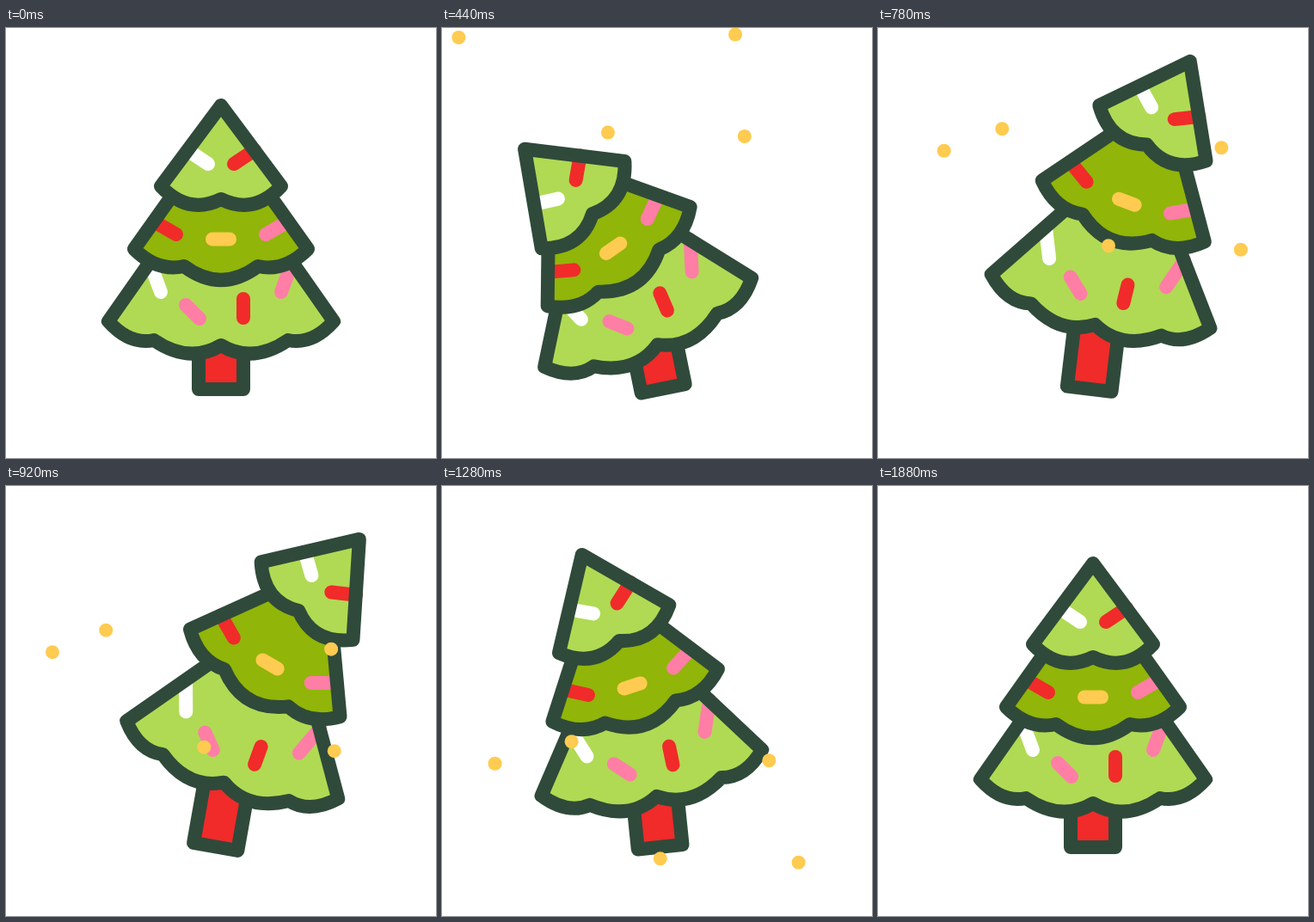
Write an HTML page that moves like this. It is 500 by 500 pixels and loops after 2.4 s.

```html
<!DOCTYPE html>
<html lang="en">
<head>
<meta charset="utf-8">
<title>Swaying tree</title>
<style>
  html, body { margin: 0; width: 100%; height: 100%; overflow: hidden; background: #fff; }
  svg { display: block; width: 100vw; height: 100vh; }
  path { stroke-width: 16; stroke-linecap: round; stroke-linejoin: round; fill: none; }
  .edge { stroke: #2f4a3a; }
  .light { fill: #b0da53; }
  .deep { fill: #91b508; }
  .red { stroke: #f02b2a; }
  .pink { stroke: #ff7ea5; }
  .white { stroke: #fff; }
  .gold { stroke: #ffcb50; }
  circle { fill: #ffcb50; }
</style>
</head>
<body>
<svg viewBox="0 0 500 500">
  <g class="part">
    <path class="edge" style="fill:#f02b2a" d="M224 325H276V420H224Z"/>
    <g class="part">
      <path class="light" d="M250 154L119 341Q144 369 172 363Q213 391 250 369Q287 391 328 363Q356 369 381 341Z"/>
      <path class="white" d="M167 272L180 307"/>
      <path class="pink" d="M333 272L320 307M209 322L225 338"/>
      <path class="red" d="M276 315V337"/>
      <path class="edge" d="M250 154L119 341Q144 369 172 363Q213 391 250 369Q287 391 328 363Q356 369 381 341Z"/>
      <g class="part">
        <path class="deep" d="M250 115L149 257Q176 284 207 277Q250 309 293 277Q324 284 351 257Z"/>
        <path class="red" d="M172 225L198 240"/>
        <path class="pink" d="M328 225L302 240"/>
        <path class="gold" d="M240 245.500H260"/>
        <path class="edge" d="M250 115L149 257Q176 284 207 277Q250 309 293 277Q324 284 351 257Z"/>
        <g class="part">
          <path class="light" d="M250 90L180 184Q212 218 250 199Q288 218 320 184Z"/>
          <path class="white" d="M211 142L235 158"/>
          <path class="red" d="M289 142L265 158"/>
          <path class="edge" d="M250 90L180 184Q212 218 250 199Q288 218 320 184Z"/>
        </g>
      </g>
    </g>
  </g>
  <g id="snow"></g>
</svg>
<script>
const LOOP = 2400;
const parts = [...document.querySelectorAll('.part')];
const pivots = [384, 350, 262, 184];

// [time, value] pairs, joined by cosine easing
const bend = [[0, 0], [385, 12.2], [912, -10.1], [1250, 5.95], [1660, 0]];
const lift = [[625, 0], [785, 24], [930, 24], [1130, 8.3], [1280, 8], [1815, 0]];
const drift = [[425, 19], [745, 78], [1110, 27], [1470, 102], [1800, 65]];

function ease(keys, t) {
  if (t <= keys[0][0]) return keys[0][1];
  for (let i = 1; i < keys.length; i++) {
    const [t0, v0] = keys[i - 1], [t1, v1] = keys[i];
    if (t < t1) return v0 + (v1 - v0) * (1 - Math.cos(Math.PI * (t - t0) / (t1 - t0))) / 2;
  }
  return keys[keys.length - 1][1];
}

const sway = t => 374.6 + 0.0192 * t + 38.4 * Math.cos(2 * Math.PI * (t - 718) / 690);
const wander = t => ease(drift, t);

// x path, time shift, x offset, height at 640 ms
const flakes = [
  [wander, 0, 0, 92],
  [wander, 50, 73, 66.5],
  [sway, -14, -156, 202.5],
  [wander, -10, 322, 88.5],
  [sway, 0, 0, 207]
].map(([path, shift, dx, y]) => {
  const dot = document.createElementNS('http://www.w3.org/2000/svg', 'circle');
  dot.setAttribute('r', 8);
  document.getElementById('snow').append(dot);
  return { dot, path, shift, dx, y };
});

function draw(t) {
  const angle = -ease(bend, t), rise = ease(lift, t);
  parts.forEach((part, i) => {
    part.setAttribute('transform', `translate(0 ${i ? -rise : 0}) rotate(${angle} 250 ${pivots[i]})`);
  });
  const fall = (t - 640) * (t < 640 ? 0.407 : 0.36);
  for (const { dot, path, shift, dx, y } of flakes) {
    dot.setAttribute('cx', path(t + shift) + dx);
    dot.setAttribute('cy', y + fall);
  }
}

const start = performance.now();
function tick() {
  draw((performance.now() - start) % LOOP);
  requestAnimationFrame(tick);
}
tick();
</script>
</body>
</html>
```
